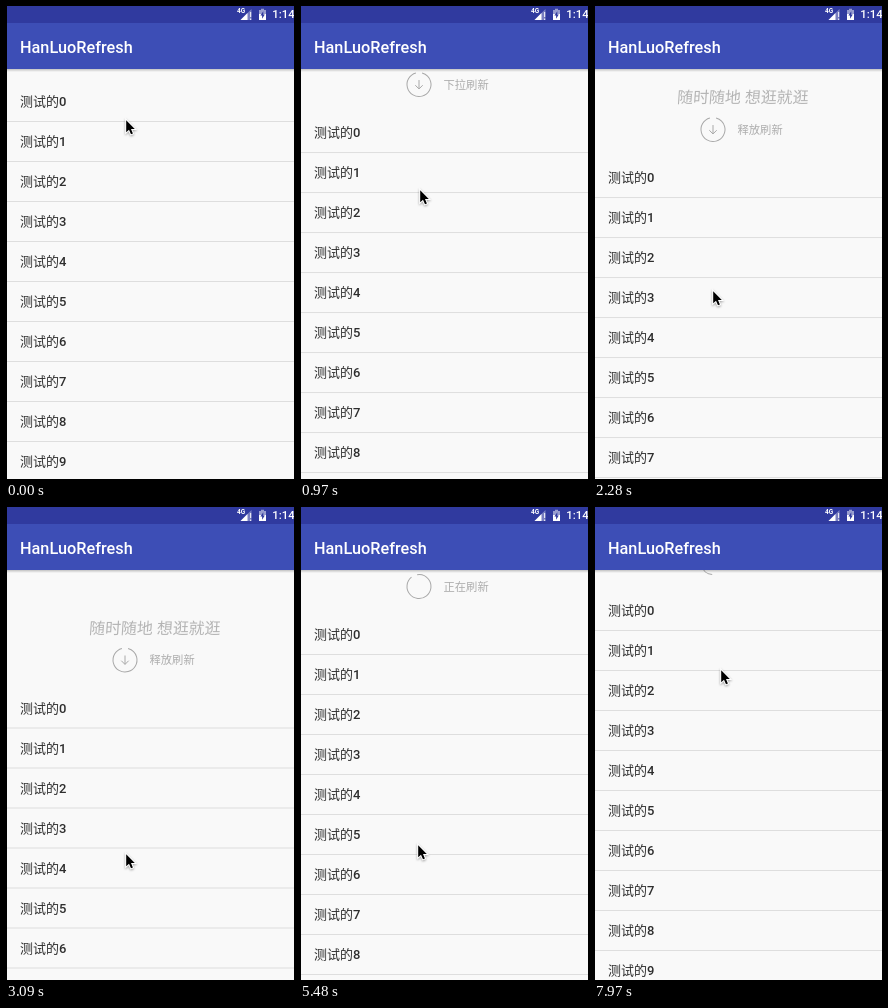
These frames come from a looping animation (288x473 px, 8 s). An HTML page:

```html
<!DOCTYPE html>
<html lang="zh-CN">
<head>
<meta charset="utf-8">
<title>HanLuoRefresh</title>
<style>
  html, body { margin: 0; width: 100%; height: 100%; overflow: hidden; background: #f9f9f9; }
  svg { display: block; width: 288px; height: 473px; }
  text { font-family: Roboto, "Noto Sans CJK SC", "Noto Sans CJK", sans-serif; }
  #rows text { font-size: 13px; font-weight: 500; fill: #2e2e2e; }
  #rows rect { fill: #dedede; }
  #label { font-size: 11.3px; font-weight: 500; fill: #adadad; }
  #slogan { font-size: 16px; font-weight: 100; fill: #b4b4b4; text-anchor: middle; }
  .line { fill: none; stroke: #a8a8a8; }
  .title { font-size: 16.25px; font-weight: 500; fill: #fff; }
  .clock { font-size: 11.4px; font-weight: 500; fill: #fff; }
  .net { font-size: 6.5px; font-weight: 700; fill: #fff; }
  #cursor { filter: drop-shadow(.5px 1px 1px rgba(0, 0, 0, .35)); }
</style>
</head>
<body>
<svg viewBox="0 0 288 473">
  <defs>
    <linearGradient id="shade" x2="0" y2="1">
      <stop stop-color="#000" stop-opacity=".22"/>
      <stop offset="1" stop-color="#000" stop-opacity="0"/>
    </linearGradient>
  </defs>
  <rect width="288" height="473" fill="#f9f9f9"/>

  <g id="list">
    <text id="slogan" transform="translate(148.5 8.5) skewX(-4)">随时随地 想逛就逛</text>
    <g transform="translate(119 35)">
      <g id="spin">
        <circle id="ring" class="line" r="12" pathLength="360" transform="scale(-1 1) rotate(-75)"/>
      </g>
      <path id="arrow" class="line" d="M0-4.5V4.3M-3.7.7 0 4.4 3.7.7"/>
    </g>
    <text id="label" x="143.5" y="39"></text>
    <g id="rows"></g>
  </g>

  <rect y="63" width="288" height="3" fill="url(#shade)"/>
  <rect y="17" width="288" height="46" fill="#3d4eb6"/>
  <rect width="288" height="17" fill="#303a9f"/>
  <text class="title" x="14" y="47">HanLuoRefresh</text>
  <text class="net" x="231" y="7.4">4G</text>
  <g fill="#fff">
    <path d="M245.5 3V14H234.5Z" opacity=".35"/>
    <path d="M241.5 7V14H234.5Z"/>
    <path d="M244 6h1.2v5H244ZM244 12.4h1.2V14H244Z" opacity=".8"/>
    <path d="M253 4h2V2.8h3V4h2v4h-7Z" opacity=".5"/>
    <path d="M253 8h7v6h-7Z"/>
  </g>
  <path d="M257.3 5.2 254.4 9.6h1.7v3.2l2.7-4.4h-1.5Z" fill="#303a9f"/>
  <text class="clock" x="266.2" y="12.2">1:14</text>
  <rect width="1" height="473" fill="#000"/>

  <path id="cursor" d="M1.2 2.2V14.2L4 11.7 6 16.2 7.9 15.4 6 11H9.8Z"
        fill="#000" stroke="#fff" stroke-width="2" paint-order="stroke"/>
</svg>
<script>
const LOOP = 8000, HEADER = 44.5, RING_FULL = 42, SPIN = 1500;
const RELEASE = 3780, SETTLED = 4080, DONE = 6755, CLOSE = 6955, REDRAG = 7375;
const $ = id => document.getElementById(id);

$('rows').innerHTML = Array.from({ length: 11 }, (_, i) =>
  `<text x="14" y="${87.6 + 40 * i}">测试的${i}</text>
   <rect x="1" y="${102.5 + 40 * i}" width="287" height="1"/>`).join('');

const smooth = u => (1 - Math.cos(Math.PI * u)) / 2;

// Each key is [time, value, easing into this key]
function track(keys, t) {
  const next = keys.findIndex(k => k[0] > t);
  if (next < 0) return keys[keys.length - 1][1];
  if (next === 0) return keys[0][1];
  const [t0, v0] = keys[next - 1], [t1, v1, ease = u => u] = keys[next];
  return v0 + (v1 - v0) * ease((t - t0) / (t1 - t0));
}

const pullKeys = [
  [60, 12.5], [970, 43.5], [2280, 88.5], [3090, 118],
  [RELEASE, 118], [SETTLED, HEADER, smooth],
  [CLOSE, HEADER], [CLOSE + 300, 0, smooth],
  [REDRAG, 0], [7970, 20.5]
];
const cursorX = [
  [60, 119], [970, 119], [2280, 118], [3090, 119], [4700, 119], [5200, 117, smooth],
  [6800, 117], [7090, 104], [7340, 125], [7970, 126]
];
const cursorY = [
  [60, 112], [970, 182], [2280, 283], [3090, 345], [4700, 345], [5200, 336, smooth],
  [6800, 336], [7090, 250], [7340, 115], [REDRAG, 115], [7970, 161]
];

function labelAt(t, pull) {
  if (t >= RELEASE && t < DONE) return '正在刷新';
  if (t >= DONE && t < REDRAG) return '刷新成功';
  return pull >= HEADER ? '释放刷新' : '下拉刷新';
}

function draw(t) {
  const pull = track(pullKeys, t);
  const busy = t >= RELEASE && t < REDRAG;
  const sweep = busy ? 330 : 330 * Math.min(1, pull / RING_FULL);
  const turn = busy ? Math.max(0, t - SETTLED) / SPIN * 360 : 0;

  $('list').setAttribute('transform', `translate(0 ${pull})`);
  $('ring').setAttribute('stroke-dasharray', `${sweep} 360`);
  $('spin').setAttribute('transform', `rotate(${turn % 360})`);
  $('arrow').setAttribute('visibility', busy ? 'hidden' : 'visible');
  $('label').textContent = labelAt(t, pull);
  $('cursor').setAttribute('transform', `translate(${track(cursorX, t)} ${track(cursorY, t)})`);
}

const start = performance.now();
function frame() {
  draw((performance.now() - start) % LOOP);
  requestAnimationFrame(frame);
}
frame();
</script>
</body>
</html>
```
